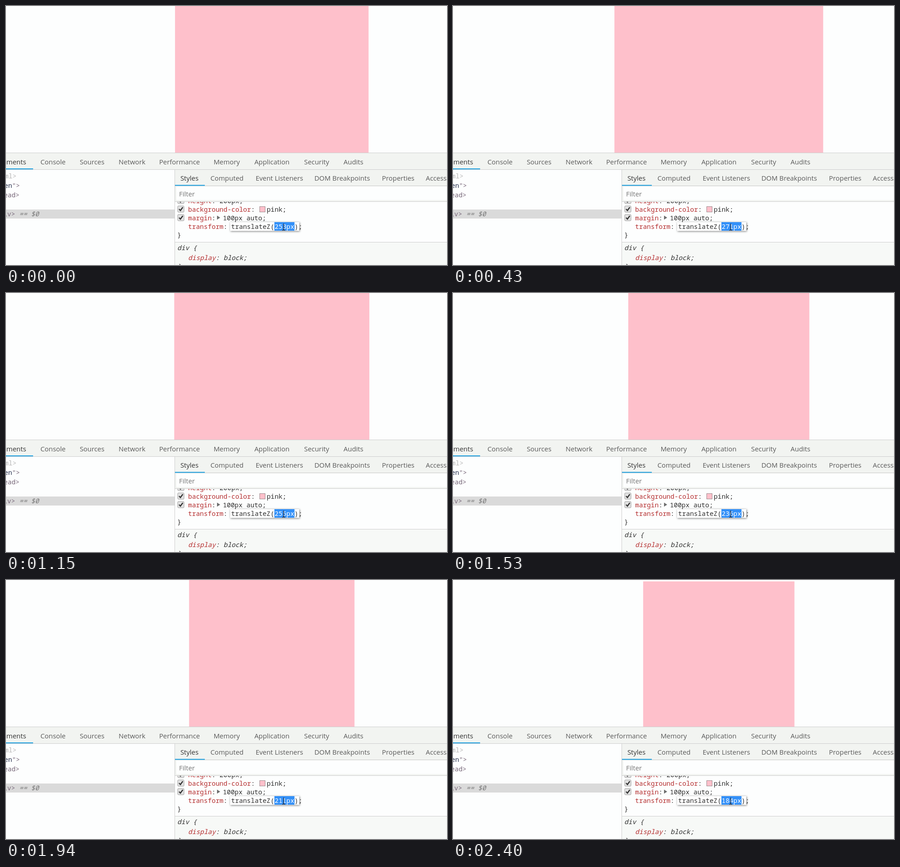
An HTML page that plays this animation: 976 by 574 pixels, repeating every 2480 ms.

```html
<!DOCTYPE html>
<html lang="en">
<head>
<meta charset="utf-8">
<title>translateZ in the styles panel</title>
<style>
  html, body { margin: 0; width: 100%; height: 100%; overflow: hidden; background: #fdfefe; }
  svg { display: block; width: 976px; height: 574px; }
  .ui { font: 14.9px "Open Sans", "Noto Sans", sans-serif; fill: #5a5a5a; }
  .mid { text-anchor: middle; }
  .on { fill: #333; }
  .code { font: 14.5px "Noto Sans Mono", "DejaVu Sans Mono", monospace; fill: #303030; }
  .prop { fill: #b52f30; }
  .tag { fill: #78687a; }
  .soft { fill: #b8b8b8; }
  .it { font-style: italic; }
  .bar { fill: #f2f4f1; }
  .line { fill: #cdcdcd; }
  .blue { fill: #1a9fe0; }
  .field { fill: #fff; filter: drop-shadow(1px 1px 2px rgba(0, 0, 0, .55)); }
</style>
</head>
<body>
<svg viewBox="0 0 976 574">
  <defs>
    <clipPath id="list"><rect x="374" y="434" width="602" height="140"/></clipPath>
    <g id="check">
      <rect x=".5" y=".5" width="14" height="14" rx="2" fill="#e2e2e2" stroke="#9c9c9c"/>
      <path d="M3.5 7.5 6.5 10.8 11.8 3.6" fill="none" stroke="#333" stroke-width="2.5"/>
    </g>
  </defs>

  <rect width="976" height="574" fill="#fdfefe"/>
  <rect id="square" fill="#fec0cb"/>

  <!-- main tab bar -->
  <rect class="bar" y="325" width="976" height="38"/>
  <rect class="line" y="325" width="976" height="1"/>
  <rect class="line" y="362" width="976" height="1"/>
  <rect class="blue" y="360" width="60" height="2"/>
  <g class="ui mid">
    <text class="on" x="44.5" y="351" style="text-anchor:end">Elements</text>
    <text x="104" y="351">Console</text>
    <text x="190.5" y="351">Sources</text>
    <text x="279" y="351">Network</text>
    <text x="384" y="351">Performance</text>
    <text x="488.5" y="351">Memory</text>
    <text x="588.5" y="351">Application</text>
    <text x="687.5" y="351">Security</text>
    <text x="769" y="351">Audits</text>
  </g>

  <!-- element tree -->
  <rect y="363" width="373" height="211" fill="#fdfefe"/>
  <rect y="451" width="373" height="20" fill="#dadada"/>
  <g class="code">
    <text class="soft" x="-3" y="382">ml&gt;</text>
    <text x="-4" y="403"><tspan fill="#26304f">en</tspan><tspan class="tag">"&gt;</tspan></text>
    <text class="tag" x="-5" y="424">ead&gt;</text>
    <text class="tag" x="-6" y="466">iv&gt;</text>
    <text class="it" x="29.5" y="466" fill="#777">== $0</text>
  </g>

  <!-- styles pane -->
  <rect x="373" y="363" width="603" height="211" fill="#fdfefe"/>
  <rect class="bar" x="373" y="363" width="603" height="71"/>
  <rect class="line" x="373" y="363" width="1" height="211"/>
  <rect class="line" x="373" y="398" width="603" height="1"/>
  <rect x="377" y="400" width="599" height="30" fill="#fdfefe"/>
  <rect class="line" x="373" y="433" width="603" height="1"/>
  <rect class="blue" x="374" y="396.5" width="66" height="2"/>
  <g class="ui mid">
    <text class="on" x="406" y="387">Styles</text>
    <text x="489" y="387">Computed</text>
    <text x="605" y="387">Event Listeners</text>
    <text x="744" y="387">DOM Breakpoints</text>
    <text x="868" y="387">Properties</text>
  </g>
  <text class="ui" x="929" y="387">Accessibility</text>
  <text class="ui" x="383" y="421.5" style="fill:#757575">Filter</text>

  <g clip-path="url(#list)">
    <rect x="373" y="524" width="603" height="50" fill="#f7f9f7"/>
    <rect class="line" x="373" y="523" width="603" height="1"/>
    <use href="#check" x="379.5" y="423.5"/>
    <use href="#check" x="379.5" y="442.5"/>
    <use href="#check" x="379.5" y="461.5"/>
    <g class="code">
      <text x="403" y="436.5"><tspan class="prop">height</tspan>: 200px;</text>
      <text x="403" y="455.5"><tspan class="prop">background-color</tspan>:</text>
      <rect x="561.5" y="444.5" width="12" height="12" fill="#fec0cb" stroke="#9b8a8d"/>
      <text x="577" y="455.5">pink;</text>
      <text x="403" y="474.5"><tspan class="prop">margin</tspan>:</text>
      <path d="M467 464.5 474 469 467 473.5Z" fill="#6e6e6e"/>
      <text x="480" y="474.5">100px auto;</text>
      <text x="403" y="493.5"><tspan class="prop">transform</tspan>:</text>
      <text x="379" y="512">}</text>
      <text class="it" x="379" y="541">div {</text>
      <text class="it" x="403" y="563"><tspan class="prop">display</tspan>: block;</text>
      <text class="it" x="379" y="582">}</text>

      <rect class="field" x="496" y="479" width="153" height="19.5"/>
      <text x="498.3" y="493.5">translateZ(</text>
      <rect x="594" y="479" width="44.5" height="19" fill="#3390f8"/>
      <text id="value" x="594.5" y="493.5" style="fill:#fff"></text>
      <text x="638.3" y="493.5">);</text>
    </g>
    <path d="M614.5 482V496M611.5 497.2Q614.5 497 614.5 495Q614.5 497 617.5 497.2" fill="none" stroke="#222c3c" stroke-width="1.4"/>
  </g>
</svg>
<script>
  const LOOP = 2480, PERSPECTIVE = 500, SIZE = 211.6, CX = 588.25, CY = 170.5;

  // Drags of the value: start ms, end ms, number of updates, first depth, last depth
  const drags = [
    [70, 430, 6, 256, 271],
    [670, 760, 2, 270, 270],
    [910, 1380, 7, 269.5, 241.2],
    [1450, 1940, 7, 240.45, 211],
    [2000, 2400, 6, 207.5, 184]
  ];
  const updates = [[0, 253]];
  for (const [start, end, count, from, to] of drags) {
    for (let i = 0; i < count; i++) {
      const k = i / (count - 1);
      const at = Math.floor((start + (end - start) * k) / 10) * 10;
      updates.push([at, Math.round(from + (to - from) * k)]);
    }
  }

  const square = document.getElementById("square");
  const value = document.getElementById("value");
  let shown;

  function show(z) {
    if (z === shown) return;
    shown = z;
    const w = SIZE * PERSPECTIVE / (PERSPECTIVE - z);
    const box = { x: CX - w / 2, y: CY - w / 2, width: w, height: w };
    for (const key in box) square.setAttribute(key, box[key]);
    value.textContent = z + "px";
  }

  const origin = performance.now();
  function frame() {
    const t = (performance.now() - origin) % LOOP;
    let z;
    for (const [at, depth] of updates) if (at <= t) z = depth;
    show(z);
    requestAnimationFrame(frame);
  }
  frame();
</script>
</body>
</html>
```
